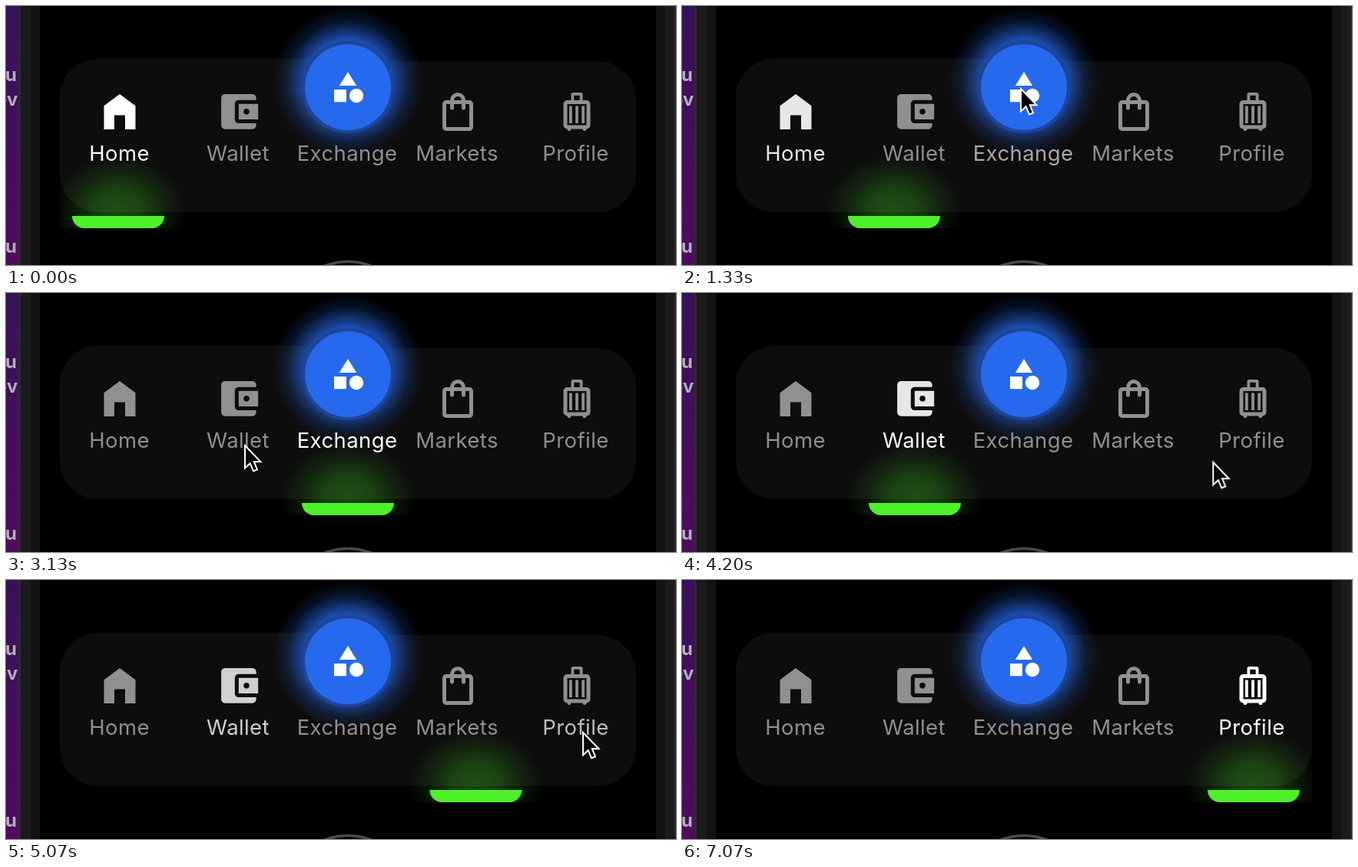
An HTML page for the animation above (7.59 s loop, 872 by 338 pixels).

```html
<!DOCTYPE html>
<html lang="en">
<head>
<meta charset="utf-8">
<title>Tab bar</title>
<style>
  html, body { margin: 0; width: 100%; height: 100%; overflow: hidden; background: #000; }
  svg { display: block; width: 872px; height: 338px; }
  .label { font: 400 27.5px Inter, Roboto, sans-serif; letter-spacing: .4px; text-anchor: middle; }
  .side { font: 700 24px Inter, "Open Sans", sans-serif; text-anchor: end; fill: #b3aebb; }
  .tab { color: #909090; fill: currentColor; }
</style>
</head>
<body>
<svg viewBox="0 0 872 338">
  <defs>
    <linearGradient id="wall" x2="0" y2="1">
      <stop offset="0" stop-color="#38105a"/>
      <stop offset="1" stop-color="#500a60"/>
    </linearGradient>
    <radialGradient id="blue" gradientUnits="userSpaceOnUse" cx="445" cy="99" r="98">
      <stop offset=".56" stop-color="#2769ec" stop-opacity=".72"/>
      <stop offset=".68" stop-color="#2769ec" stop-opacity=".46"/>
      <stop offset=".82" stop-color="#2769ec" stop-opacity=".17"/>
      <stop offset="1" stop-color="#2769ec" stop-opacity="0"/>
    </radialGradient>
    <radialGradient id="green">
      <stop offset="0" stop-color="#4ef02a" stop-opacity=".3"/>
      <stop offset=".35" stop-color="#4ef02a" stop-opacity=".24"/>
      <stop offset=".68" stop-color="#4ef02a" stop-opacity=".1"/>
      <stop offset="1" stop-color="#4ef02a" stop-opacity="0"/>
    </radialGradient>
    <clipPath id="bar"><rect x="70" y="0" width="750" height="290"/></clipPath>
  </defs>

  <rect width="17" height="338" fill="url(#wall)"/>
  <g class="side">
    <text x="14" y="98">u</text>
    <text x="15.5" y="130">ov</text>
    <text x="14" y="322">u</text>
  </g>
  <rect x="16" width="4" height="338" fill="#2b2b2d"/>
  <rect x="19" width="13" height="338" fill="#1a1a1a"/>
  <rect x="32" width="12" height="338" fill="#121212"/>
  <rect x="846" width="12" height="338" fill="#121212"/>
  <rect x="858" width="12" height="338" fill="#1b1b1b"/>
  <rect x="870" width="2" height="338" fill="#2b2b2d"/>
  <circle cx="445" cy="417.5" r="84" fill="none" stroke="#4a4a4a" stroke-width="3.5"/>

  <path fill="#0d0d0d" d="M120 69H445V72H770a50 50 0 0 1 50 50V219a50 50 0 0 1-50 50H120a50 50 0 0 1-50-50V119a50 50 0 0 1 50-50z"/>

  <g clip-path="url(#bar)">
    <g id="marker">
      <ellipse cy="267" rx="89" ry="74" fill="url(#green)"/>
      <path fill="#4ef02a" d="M-60 274H60a16 16 0 0 1-16 16H-44a16 16 0 0 1-16-16z"/>
    </g>
  </g>

  <circle cx="445" cy="99" r="98" fill="url(#blue)"/>
  <circle cx="445" cy="106" r="60" fill="#1c459c"/>
  <circle cx="445" cy="106" r="56" fill="#2769ec"/>
  <path fill="#fff" d="M445 86l11.2 18h-22.4zM427 109h16v16.300h-16z"/>
  <circle cx="456" cy="117" r="9.200" fill="#fff"/>

  <g id="tabs"></g>

  <g id="cursor">
    <path d="M1 2V31.500L7.700 25.200L12 35.500L17 33.400L12.800 23.300H21.500z" fill="#000" stroke="#fff" stroke-width="2"/>
  </g>
</svg>
<script>
const LOOP = 7590, FADE = 800, ICON_DELAY = 550;
const OFF = '#909090', ON = '#ffffff';
const TO_EXCHANGE = 1200, TO_WALLET = 3270, TO_PROFILE = 4865;

const icons = {
  home: 'M148 115L168.500 130.300V161H155V142.500H141V161H127.500V130.300z',
  wallet: 'M21 18v1c0 1.100-.9 2-2 2H5c-1.110 0-2-.9-2-2V5c0-1.100.89-2 2-2h14c1.100 0 2 .9 2 2v1h-9c-1.110 0-2 .9-2 2v8c0 1.100.89 2 2 2h9zm-9-2h10V8H12zm4-2.500a1.500 1.500 0 1 1 0-3 1.500 1.500 0 0 1 0 3z',
  bag: 'M18 6h-2a4 4 0 0 0-8 0H6a2 2 0 0 0-2 2v12a2 2 0 0 0 2 2h12a2 2 0 0 0 2-2V8a2 2 0 0 0-2-2zm-6-2a2 2 0 0 1 2 2h-4a2 2 0 0 1 2-2zm6 16H6V8h2v2a1 1 0 0 0 2 0V8h4v2a1 1 0 0 0 2 0V8h2z',
  luggage: 'M17 6h-2V3a1 1 0 0 0-1-1h-4a1 1 0 0 0-1 1v3H7a2 2 0 0 0-2 2v11a2 2 0 0 0 2 2 1 1 0 0 0 2 0h6a1 1 0 0 0 2 0 2 2 0 0 0 2-2V8a2 2 0 0 0-2-2zM10.500 3.500h3V6h-3zM17 19H7V8h10zM8 9h1.500v9H8zM11.250 9h1.500v9h-1.500zM14.500 9H16v9h-1.500z'
};

// on: 0 means selected when the loop begins
const tabs = [
  { name: 'Home', x: 147.5, icon: 'home', on: 0, off: TO_EXCHANGE },
  { name: 'Wallet', x: 302, icon: 'wallet', at: 'translate(272.500 107.500) scale(2.530)', on: TO_WALLET, off: TO_PROFILE },
  { name: 'Exchange', x: 444, on: TO_EXCHANGE, off: TO_WALLET },
  { name: 'Markets', x: 587, icon: 'bag', at: 'translate(558 108) scale(2.5)' },
  { name: 'Profile', x: 741.5, icon: 'luggage', at: 'translate(713 108) scale(2.5)', on: TO_PROFILE }
];

// steps: [ms, properties, easing towards the next step]
function play(el, steps) {
  const all = [[0, steps[0][1]], ...steps, [LOOP, steps[steps.length - 1][1]]];
  el.animate(
    all.map(([ms, props, easing = 'linear']) => ({ ...props, offset: ms / LOOP, easing })),
    { duration: LOOP, iterations: Infinity }
  );
}

function add(parent, tag, attrs) {
  const el = document.createElementNS('http://www.w3.org/2000/svg', tag);
  for (const key in attrs) el.setAttribute(key, attrs[key]);
  return parent.appendChild(el);
}

function fade(el, { on, off }, delay) {
  if (on === undefined) return;
  const steps = [];
  if (on) steps.push([on + delay, { color: OFF }, 'ease'], [on + delay + FADE, { color: ON }]);
  else steps.push([0, { color: ON }]);
  if (off) steps.push([off, { color: ON }, 'ease'], [off + FADE, { color: OFF }]);
  play(el, steps);
}

const move = (x, y = 0) => ({ transform: `translate(${x}px, ${y}px)` });
const byId = id => document.getElementById(id);

for (const tab of tabs) {
  const label = add(byId('tabs'), 'text', { class: 'tab label', x: tab.x, y: 202 });
  label.textContent = tab.name;
  fade(label, tab, 0);
  if (!tab.icon) continue;
  const icon = add(byId('tabs'), 'path', {
    class: 'tab', d: icons[tab.icon], 'fill-rule': 'evenodd', transform: tab.at || ''
  });
  fade(icon, tab, ICON_DELAY);
}

const stops = [146, 445, 303, 744];
play(byId('marker'), [TO_EXCHANGE, TO_WALLET, TO_PROFILE].flatMap((ms, i) => [
  [ms, move(stops[i]), 'ease'],
  [ms + 500, move(stops[i + 1])]
]));

play(byId('cursor'), [
  [400, move(-30, 240), 'ease-in-out'],
  [1130, move(440, 106)],
  [2800, move(440, 106), 'ease-in-out'],
  [3130, move(310, 197)],
  [3650, move(310, 197), 'ease-in'],
  [4070, move(637, 223)],
  [4200, move(690, 219), 'ease-out'],
  [4530, move(750, 197)]
]);
play(byId('cursor'), [
  [6330, { opacity: 1 }],
  [6400, { opacity: 0 }]
]);
</script>
</body>
</html>
```
